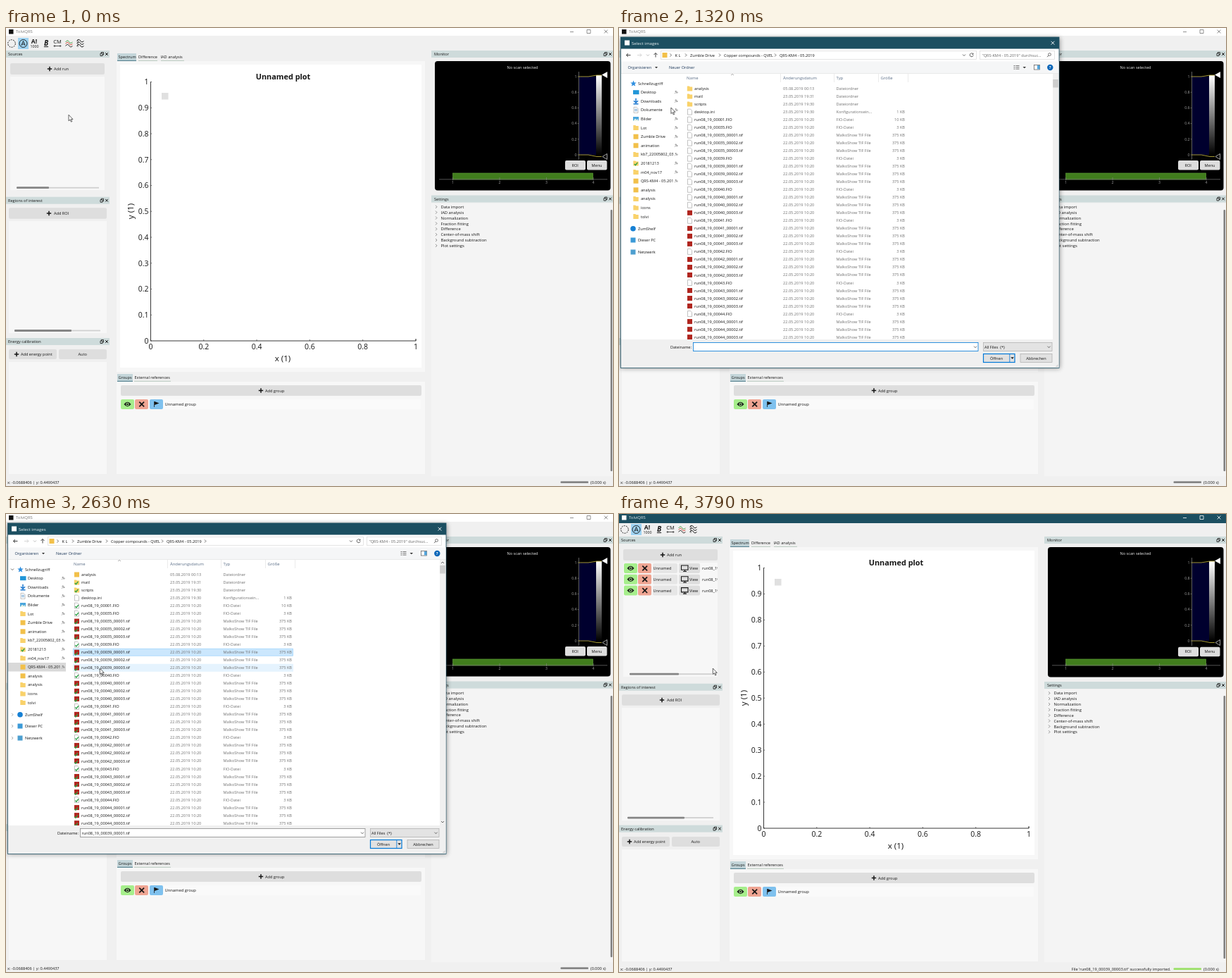
An HTML page for the animation above (4.18 s loop, 862 by 650 pixels).

```html
<!DOCTYPE html>
<html lang="en">
<head>
<meta charset="utf-8">
<title>Import of runs</title>
<style>
  html, body { margin: 0; width: 100%; height: 100%; overflow: hidden; background: #f0f0f0; }
  svg { display: block; }
  text { font-family: "Open Sans", "Noto Sans", sans-serif; white-space: pre; }
</style>
</head>
<body>
<svg id="stage" width="862" height="650" viewBox="0 0 862 650">
  <defs>
    <linearGradient id="grey" x2="0" y2="1"><stop stop-color="#fff"/><stop offset="1"/></linearGradient>
    <filter id="shade" x="-5%" y="-5%" width="110%" height="110%"><feGaussianBlur stdDeviation="3.5"/></filter>
  </defs>
  <g id="main"></g><g id="dialog"></g><g id="pointer"></g>
</svg>
<script>
const LOOP = 4180, STEP = 77.3;
const APP = 'TolviQRS', FOLDER = 'QRS-KM4 - 05.2019';
const TEAL = '#1c4f61', INK = '#151515';

// Markup helpers; text is placed by its vertical centre.
const rect = (x, y, w, h, fill, extra = '') =>
  `<rect x="${x}" y="${y}" width="${w}" height="${h}" fill="${fill}" ${extra}/>`;
const box = (x, y, w, h, fill, stroke, sw = .7) =>
  rect(x + .5, y + .5, w - 1, h - 1, fill, `stroke="${stroke}" stroke-width="${sw}"`);
const text = (x, y, str, { size = 5.6, fill = INK, at = 'start', extra = '' } = {}) =>
  `<text x="${x}" y="${y + size * .36}" font-size="${size}" fill="${fill}" text-anchor="${at}" ${extra}>${str}</text>`;
const line = (d, stroke = INK, w = .8, extra = '') =>
  `<path d="${d}" fill="none" stroke="${stroke}" stroke-width="${w}" ${extra}/>`;
const shape = (d, fill, extra = '') => `<path d="${d}" fill="${fill}" ${extra}/>`;
const dot = (x, y, r, fill, extra = '') => `<circle cx="${x}" cy="${y}" r="${r}" fill="${fill}" ${extra}/>`;
const clip = (x, y, w, h, inner) => `<svg x="${x}" y="${y}" width="${w}" height="${h}">${inner}</svg>`;
const cross = (x, y, r, color = INK, w = 1) =>
  line(`M${x - r} ${y - r}l${2 * r} ${2 * r}m0 ${-2 * r}l${-2 * r} ${2 * r}`, color, w);
const plus = (x, y) => line(`M${x - 3.2} ${y}h6.4M${x} ${y - 3.2}v6.4`, INK, 1.5);
const right = (x, y, color = '#777') => line(`M${x - 1} ${y - 2}l2 2l-2 2`, color, .8);
const down = (x, y, color = '#444') => line(`M${x - 2} ${y - 1}l2 2l2 -2`, color, .8);
const range = n => [...Array(n).keys()];

const button = (x, y, w, h, label, tx, px, fill = '#dedede') =>
  rect(x, y, w, h, fill, 'rx="2"') + (px ? plus(px, y + h / 2) : '') + text(tx, y + h / 2, label);

const dock = (x, w, y, label) => {
  const r = x + w;
  return rect(x, y, w, 10, '#cedbdb') + text(x + (x ? 4 : 3), y + 5.2, label) +
    line(`M${r - 13} ${y + 4}h3v3.5h-3zM${r - 11.7} ${y + 4}v-1.5h3.2v3.5h-1.5`, INK, .8) +
    cross(r - 4, y + 5, 1.8);
};

const scroll = (x, y, thumb, track) =>
  rect(x, y - .9, track, 1.8, '#d0d0d0') + rect(x, y - 1.4, thumb, 2.8, '#858585', 'rx="1"');

const eye = (x, y) =>
  shape(`M${x - 5} ${y}q5 -6.4 10 0q-5 6.4 -10 0z`, INK) + dot(x, y, 2.2, '#a8ee8e') + dot(x, y, 1.2, INK);
const rowButtons = (x, y) =>
  rect(x, y - 7, 19, 14, '#a6ee8c', 'rx="2"') + eye(x + 9.5, y) +
  rect(x + 20, y - 7, 19, 14, '#efa593', 'rx="2"') + cross(x + 29.7, y, 3.4, INK, 1.7);

function titleBar(active) {
  const ink = active ? '#fff' : '#777';
  return rect(0, 0, 862, active ? 13 : 11, active ? TEAL : '#fff') +
    rect(4, 2, 6.5, 6.5, active ? '#fff' : '#111') +
    text(14, 5.2, APP, { size: 5.9, fill: active ? '#dfe9ec' : '#777' }) +
    line('M801 5.5h5M825 2.5h5v5h-5z', ink, .8) + cross(852, 5, 2.4, ink, .8);
}

function toolBar() {
  const wave = (x, y, color) => line(`M${x} ${y}q3 -4 5 -.5t5 .5`, color, 1);
  return dot(8, 22, 5.3, 'none', 'stroke="#222" stroke-dasharray="2 1.3"') +
    rect(17, 14, 15, 16, '#9fd3f2') + dot(24.5, 22, 5.5, 'none', 'stroke="#111" stroke-width=".9"') +
    line('M21.8 25l2.7 -6.5l2.7 6.5m-4.4 -2h3.4', INK, .9) +
    text(40, 19, 'A!', { size: 8.5, at: 'middle', extra: 'font-weight="700"' }) +
    text(40.5, 26, '1000', { size: 5.2, at: 'middle' }) +
    text(57, 21.5, 'B', { size: 10, at: 'middle', extra: 'font-weight="700" font-style="italic" text-decoration="underline"' }) +
    text(73, 19.5, 'CM', { size: 7.5, at: 'middle' }) +
    line('M68 25.5h10m-8.5 -1.5l-1.5 1.5l1.5 1.5m7 -3l1.5 1.5l-1.5 1.5', INK, .7) +
    wave(84.5, 20, '#45a045') + wave(84.5, 22.5, '#d64b3c') + wave(84.5, 25.5, '#333') +
    [18.5, 22, 25.5].map(y => wave(100.5, y, INK)).join('') + line('M102 16v11', INK, .6);
}

function sources(s) {
  const rows = range(s.runs).map(i => {
    const y = 77 + 15.8 * i;
    return rowButtons(7, y) + rect(48, y - 7, 35, 14, '#e6e6e6', 'rx="2"') + text(48.5, y, 'Unnamed') +
      rect(85, y - 7, 30, 14, '#dedede', 'rx="2"') + line(`M88.5 ${y - 4}h9.5v6.3h-9.5zM91 ${y + 4.5}h5m-2.5 -2v2`, INK, 1.1) +
      text(100, y, 'View') + clip(117, y - 5, 23, 10, text(1, 5, 'run08_19_00039'));
  });
  return dock(0, 147, 32, 'Sources') +
    button(6, 50, 134, 16, 'Add run', 68, 62, s.hover ? '#c0d4dc' : '#dedede') +
    rect(6, 69, 134, 161 + s.d / 2, '#f7f7f7') + rows.join('') +
    scroll(15, 226.7 + s.d / 4, s.runs ? 70 : 46, 117);
}

function plot(d) {
  const bottom = 444 + d, y = i => bottom - (bottom - 76.5) * i / 10;
  const big = { size: 10.5 };
  return rect(157, 47, 438, 441 + d, '#f7f7f7') + rect(162, 52, 428, 430 + d, '#fff') +
    rect(158, 36, 27, 10, '#c4d6da') + line('M158 46.3h27', '#3b7080', 1) +
    line('M188 46.3h27m5 0h33', '#9fb8a8', .7) +
    text(159.5, 41.3, 'Spectrum') + text(188, 41.3, 'Difference') + text(219.5, 41.3, 'IAD analysis') +
    text(393.5, 69, 'Unnamed plot', { size: 10.9, at: 'middle', extra: 'font-weight="700"' }) +
    rect(221, 92, 9.5, 9.5, '#e0e0e0') +
    line(`M205.5 76.5V${bottom}H582v-3`, '#222', .9) +
    range(11).map(i => text(202.5, y(i), i % 10 ? '0.' + i : i / 10, { ...big, at: 'end' }) +
      line(`M205 ${y(i)}h2`, '#222', .6)).join('') +
    range(6).map(i => text(205.5 + 75.3 * i, bottom + 8.5, i % 5 ? '0.' + 2 * i : i / 5, { ...big, at: 'middle' }) +
      line(`M${205.5 + 75.3 * i} ${bottom}v-2`, '#222', .6)).join('') +
    text(393, bottom + 24.5, 'x (1)', { size: 11.6, at: 'middle' }) +
    text(0, 0, 'y (1)', { size: 11.6, at: 'middle', extra: `transform="translate(177 ${260 + d / 2}) rotate(-90)"` });
}

function groups(d) {
  const y = 534 + d;
  return rect(158, 491 + d, 22, 10, '#c4d6da') + line(`M158 ${501.3 + d}h22`, '#3b7080', 1) +
    line(`M182 ${501.3 + d}h52`, '#9fb8a8', .7) +
    text(159.5, 496.2 + d, 'Groups') + text(182.5, 496.2 + d, 'External references') +
    rect(157, 502 + d, 438, 131, '#f7f7f7') + button(163, 507 + d, 427, 15, 'Add group', 368, 362) +
    rect(163, y - 7, 426, 14, '#fafafa') + rowButtons(163, y) +
    rect(204, y - 7, 19, 14, '#7fc1ee', 'rx="2"') +
    line(`M210.5 ${y - 4}v8`, INK, .8) + shape(`M211 ${y - 4}l6.5 2.5l-6.5 2.5z`, INK) +
    text(225.5, y, 'Unnamed group', { size: 5.8 });
}

function monitor(d) {
  const tick = { size: 5.2, fill: '#a0a0a0' };
  return dock(604, 258, 32, 'Monitor') + rect(609, 47, 249.5, 183.5 + d / 2, '#000', 'rx="4"') +
    text(733.5, 55.8, 'No scan selected', { fill: '#eee', at: 'middle' }) +
    rect(814, 69, 24, 111, '#00002e') + rect(838, 67, 8, 113, 'url(#grey)') +
    line('M813.5 62v125', '#8a8a8a', .7) +
    range(6).map(i => text(810.5, 180 - 22.2 * i, i % 5 ? '0.' + 2 * i : i / 5, { ...tick, at: 'end' }) +
      line(`M811.5 ${180 - 22.2 * i}h2`, '#8a8a8a', .6)).join('') +
    line('M813 69h14l12 -2h7M813 180h14l12 2.5h7', '#b5a83a', .9) +
    shape('M846 66.5l8 -4.5v9z', '#fff') + shape('M847 182.5l6.5 -4v8z', '#000', 'stroke="#ccc" stroke-width=".8"') +
    button(794, 188 + d / 3, 29, 13.5, 'ROI', 803.5) + button(825, 188 + d / 3, 28.5, 13.5, 'Menu', 831.5) +
    box(634, 205.5, 200, 10, '#417d1d', '#5c9a35') + line('M615 214.8h239', '#777', .7) +
    range(4).map(i => text(634.5 + 66.5 * i, 219, i + 1, { ...tick, at: 'middle' }) +
      line(`M${634.5 + 66.5 * i} 212v4`, '#8a8a8a', .6)).join('');
}

function settings(d) {
  const items = ['Data import', 'IAD analysis', 'Normalization', 'Fraction fitting', 'Difference',
    'Center-of-mass shift', 'Background subtraction', 'Plot settings'];
  return dock(604, 258, 237.5 + d / 4, 'Settings') + rect(604, 248.5, 258, 388, '#f4f4f4') +
    items.map((item, i) => {
      const y = 253.8 + 7.87 * i + d / 5;
      return right(611, y) + text(617.5, y, item, { size: 5.85 });
    }).join('') + rect(858.5, 258, 2.6, 371 + d, '#808080', 'rx="1"');
}

function mainWindow(s) {
  const d = s.d;
  return rect(0, 0, 862, 650, '#f0f0f0') + titleBar(s.active) + toolBar() + sources(s) +
    dock(0, 147, 239.7 + d / 2, 'Regions of interest') + button(4, 255.3 + d / 2, 139, 15.5, 'Add ROI', 68, 61) +
    rect(4, 274 + d / 2, 139, 159 + d / 2, '#f7f7f7') + scroll(12, 429.5 + d * .8, 81, 122) +
    dock(0, 147, 440 + d * .8, 'Energy calibration') +
    button(4, 456 + d, 68, 14, 'Add energy point', 21, 15) + button(75, 456 + d, 68, 14, 'Auto', 102.5) +
    rect(4, 474 + d, 139, 159, '#f7f7f7') +
    plot(d) + groups(d) + monitor(d) + settings(d) +
    text(2, 644.7 + d / 2, 'x: -0.0688406 | y: 0.4490437') +
    (s.runs ? text(783.5, 645.8, `File 'run08_19_00039_0000${s.runs}.tif' successfully imported.`, { at: 'end' }) : '') +
    rect(787.5, 643.3 + d / 2, 39.5, 2.6, s.runs ? '#9be068' : '#858585', 'rx="1"') +
    text(830, 644.7 + d / 2, '(0.000 s)');
}

const folder = (x, y) => shape(`M${x - 3.7} ${y - 3.5}h3l1 1h3.4v6h-7.4z`, '#f9d26a');
const sheet = (x, y) => shape(`M${x - 3} ${y - 4}h4l2 2v6h-6z`, '#fff', 'stroke="#999" stroke-width=".6"');
const tile = (x, y, color) => rect(x - 3.5, y - 3.5, 7, 7, color);
const check = (x, y) => line(`M${x - 2.2} ${y + 1}l1.6 1.7l3 -3.8`, '#27a243', 1.3);

const files = [['analysis', '05.08.2019 00:13'], ['matl', '23.05.2019 19:31'], ['scripts', '23.05.2019 19:30']]
  .map(([name, date]) => ({ name, date, kind: 'Dateiordner' }));
files.push({ name: 'desktop.ini', date: '23.05.2019 19:30', kind: 'Konfigurationsein...', size: 1 });
for (const run of [1, 35, 39, 40, 41, 42, 43, 44]) {
  const name = 'run08_19_000' + String(run).padStart(2, '0'), date = '22.05.2019 10:20';
  files.push({ name: name + '.FIO', date, kind: 'FIO-Datei', size: run > 1 ? 3 : 10 });
  if (run > 1) for (const part of [1, 2, 3])
    files.push({ name: `${name}_0000${part}.tif`, date, kind: 'MalkoShow TIF File', size: 375 });
}

function fileIcon(file, i, y, synced) {
  if (i < 3) return synced && !i ? tile(100.5, y, '#f2c04a') : folder(100.5, y) + (synced ? check(100, y) : '');
  if (file.size === 375 && (synced || i > 15)) return tile(100.5, y, '#b0261f') + (synced ? check(99.5, y + 1) : '');
  return sheet(100.5, y) + (synced && i > 3 ? check(100.5, y) : '');
}

function fileList(s) {
  const meta = { fill: '#707070' };
  return files.map((file, i) => {
    const y = 86 + 11.02 * i, picked = i >= 10 && i < 10 + s.picked;
    return (picked ? box(95, y - 5.5, 313, 11, '#cbe7fd', '#99d1fb') : i === s.row ? rect(95, y - 5.5, 313, 11, '#e5f3fe') : '') +
      fileIcon(file, i, y, s.synced) + text(107, y, file.name, { size: 5.65 }) +
      text(233, y, file.date, meta) + text(308.5, y, file.kind, meta) +
      (file.size ? text(406, y, file.size + ' KB', { ...meta, at: 'end' }) : '');
  }).join('');
}

function sidebar(s) {
  const names = ['Schnellzugriff', 'Desktop', 'Downloads', 'Dokumente', 'Bilder', 'Lot', 'Zumble Drive', 'animation',
    'kb7_22005802_03', '20181213', 'm04_nov17', FOLDER, 'analysis', 'analysis', 'icons', 'tolvi'];
  const icon = (i, y) => {
    if (!i) return shape(`M20.5 ${y - 4}l1.2 2.8l3 .2l-2.3 2l.8 3l-2.7 -1.7l-2.7 1.7l.8 -3l-2.3 -2l3 -.2z`, '#2f8fe0');
    if (i === 1) return rect(20, y - 3, 8.5, 6, '#2196d8');
    if (i === 2) return line(`M24 ${y - 4}v6.5m-3 -3l3 3l3 -3M20.5 ${y + 4}h7`, '#1d78d0', 1.5);
    if (i === 3) return sheet(24, y) + line(`M22 ${y - 1}h4m-4 2h4`, '#4c8fc8', .8);
    if (i === 4) return rect(20, y - 3, 8, 6, '#4aa6dc') + shape(`M20 ${y + 3}l3 -3.5l2 2l1.5 -1.5l1.5 3z`, '#e8f3e8');
    if ([6, 7, 11, 12].includes(i)) return tile(24, y, '#f2c04a');
    return folder(24, y) + (i === 9 ? check(24, y) : '');
  };
  const selected = s.nav ? rect(3, 211, 82, 12.5, s.nav) : '';
  const list = names.map((name, i) => {
    const y = 78.6 + 12.6 * i;
    return icon(i, y) + clip(i ? 31 : 27, y - 6, i === 11 ? 46 : 54, 12, text(0, 6, name)) +
      (i && i < 12 ? line(`M79 ${y + 2}l1.7 -1.7m-.8 -1.8l2.6 2.6m-1.8 -3.3l2.6 2.6l-1.8 .7m-.8 -3.3l-.8 1.8`, '#777', .7) : '');
  }).join('');
  const roots = tile(20, 301, '#3b9ad8') + dot(20, 284.8, 3.8, '#1680d4') +
    tile(20, 318, '#4d9fd0') + text(27, 284.8, 'ZumShelf') + text(27, 301, 'Dieser PC') + text(27, 318, 'Netzwerk');
  const arrows = `<g opacity="${s.arrows}">${down(9, 78.6)}${[284.8, 301, 318].map(y => right(9, y, '#999')).join('')}</g>`;
  const tip = s.tip ? box(28, 211.5, 55, 12, '#fff', '#777') + text(31, 217.2, FOLDER) : '';
  return selected + list + roots + arrows + tip;
}

function dialogWindow(s) {
  if (!s.open) return '';
  const grey = { fill: '#5c6f88' };
  const path = [[79.5, 'K L'], [101, 'Zumble Drive'], [149, 'Copper compounds - QVEL'], [228, FOLDER]];
  const head = rect(2, 14, 624, 469, '#000', 'opacity=".4" filter="url(#shade)"') +
    rect(2.5, 13, 622.5, 469.5, '#fff', `stroke="${TEAL}" stroke-width=".8"`) + rect(2.5, 13, 622.5, 16.5, TEAL) +
    (s.closing ? '' : rect(8, 17.5, 7, 7, '#fff') + cross(616, 21.2, 2.4, '#fff', .9)) +
    text(s.closing ? 7 : 18, 21.4, 'Select images', { size: 6.1, fill: '#e9f1f3' });
  const address = line('M10.5 38.5h6m-6 0l2.5 -2.5m-2.5 2.5l2.5 2.5M52 41.5v-6m-2.5 2.5l2.5 -2.5l2.5 2.5', '#333', .9) +
    line('M26 38.5h6m0 0l-2.5 -2.5m2.5 2.5l-2.5 2.5', '#ccc', .8) + down(41, 38.5, '#aaa') +
    box(59, 32, 449, 13, '#fff', '#d9d9d9') + tile(65, 38.5, '#f2c04a') +
    path.map(([x, name]) => right(x - 6, 38.5, '#444') + text(x, 38.5, name)).join('') +
    (s.trail ? right(283, 38.5, '#444') : '') + down(490, 38.5) +
    line('M502.5 36.5a2.5 2.5 0 1 0 .7 2m-.2 -3v1.8h-1.8', '#444', .8) +
    box(512, 32, 107, 13, '#fff', '#d9d9d9') + text(515.5, 38.5, `"${FOLDER}" durchsuc...`, { fill: '#666' }) +
    dot(611.5, 37.5, 1.9, 'none', 'stroke="#555" stroke-width=".8"') + line('M610 39l-2 2.2', '#555', .9);
  const tools = rect(3, 47.5, 621.5, 17, '#f5f6f7') + line('M3 64.5h621.5', '#e2e2e2', .7) +
    text(12.5, 56, 'Organisieren', { fill: '#1e395b' }) + shape('M51 55h4l-2 2.2z', '#333') +
    text(71, 56, 'Neuer Ordner', { fill: '#1e395b' }) +
    line('M560.5 53.5h2m1 0h5m-8 2.3h2m1 0h5m-8 2.3h2m1 0h5', '#666', .9) + shape('M573.5 55h4.5l-2.2 2.2z', '#333') +
    box(589, 52, 9, 7.5, '#fff', '#555') + rect(594, 53, 3.5, 5.5, '#51a4dc') +
    dot(612.3, 56, 4.2, '#0a66b8') + text(612.3, 56, '?', { fill: '#fff', size: 6, at: 'middle', extra: 'font-weight="700"' });
  const columns = [[96, 'Name'], [233, 'Änderungsdatum'], [308.5, 'Typ'], [371.5, 'Größe']]
    .map(([x, name]) => text(x, 71, name, { ...grey, size: 5.9 })).join('') +
    line('M229.5 65v12M305.5 65v12M368.5 65v12M410.5 65v12', '#e2e2e2', .7) + line('M159 67l2 -1.6l2 1.6', '#888', .7);
  const bar = rect(616, 65, 8.5, 377, '#f0f0f0') + rect(616.2, 73, 7.6, 11.5, '#cdcdcd') +
    (s.bar ? line('M618 70l2 -2l2 2M618 436l2 2l2 -2', '#444', .8) : '');
  const foot = rect(3, 442, 621.5, 40, '#f0f0f0') + text(103, 452.5, 'Dateiname:', { at: 'end' }) +
    box(105, 446, 405.5, 13, '#fff', s.focus ? '#0078d7' : '#8a8a8a', .8) + down(506, 452.7) +
    text(107.5, 452.7, s.fileName) +
    box(517, 446, 98.5, 13, '#e3e3e3', '#adadad') + text(519, 452.7, 'All Files  (*)') + down(610.5, 452.7) +
    box(517, 462, 45.5, 13, '#e1e1e1', '#0078d7', 1.2) + line('M554.8 462.5v12', '#0078d7', .8) +
    text(536, 468.5, 'Öffnen', { at: 'middle' }) + shape('M556.4 467.3h4.4l-2.2 2.4z', '#111') +
    box(569.5, 462, 46, 13, '#e1e1e1', '#adadad') + text(592.5, 468.5, 'Abbrechen', { at: 'middle' }) +
    line('M623.5 478l-3 3m3 -1l-1 1', '#aaa', .7);
  return head + address + tools + sidebar(s) + columns + fileList(s) + bar + foot;
}

const track = [[0, 89, 123.5], [540, 88.5, 60.5], [1243, 88.5, 60.5], [1470, 43.5, 222], [1940, 44, 222],
  [2165, 136, 202], [2390, 134, 196], [2630, 133.3, 219], [LOOP, 133.3, 219]];
function pointerAt(t) {
  const held = Math.max(0, 80 + Math.floor((t - 70) / STEP) * STEP);
  const i = Math.max(1, track.findIndex(key => key[0] >= held));
  const [t0, x0, y0] = track[i - 1], [t1, x1, y1] = track[i];
  const k = (held - t0) / (t1 - t0);
  return { x: x0 + (x1 - x0) * k, y: y0 + (y1 - y0) * k };
}

function pointer(t, { x, y }) {
  const clicked = [[850, 1000], [1700, 1780], [2400, 2480], [2780, 2860]].some(([a, b]) => t >= a && t < b);
  const ring = clicked ? dot(x + .5, y - .5, 4.8, '#a3cf2b', 'opacity=".9"') + dot(x + .5, y - .5, 2, '#d5ea8d') : '';
  if (t >= 620 && t < 1320) return ring;
  const outline = 'stroke="#222" stroke-width=".7" stroke-linejoin="round"';
  const hand = t >= 1400 && x < 87
    ? `M${x - .8} ${y}q1 -1 1.8 0v4l4 1q1 .3 .8 1.5l-.8 4v1.5h-5l-3 -4q-.5 -1.5 1 -1l1.2 1z`
    : `M${x} ${y}v8.6l2 -1.8l1.4 3.2l1.4 -.6l-1.4 -3.1h2.6z`;
  return ring + shape(hand, '#fff', outline);
}

function stateAt(t) {
  const cursor = pointerAt(t), open = t >= 1320 && t < 3560;
  const picked = t >= 2780 ? 3 : t >= 2400 ? 1 : 0;
  const file = n => `run08_19_00039_0000${n}.tif`;
  const fade = Math.floor((t - 2780) / (2 * STEP)) / 4.5;
  const runs = t >= 3790 ? 3 : t >= 3710 ? 2 : t >= 3640 ? 1 : 0;
  return {
    cursor, open, picked, runs,
    d: runs ? 2 : 0,
    active: (t >= 850 && t < 1320) || t >= 3560,
    hover: t < 1320 && cursor.y < 66,
    closing: t >= 3480,
    synced: t >= 1700,
    bar: t >= 1540,
    focus: t < 1780,
    trail: t >= 1850,
    tip: t >= 1470 && t < 1850,
    nav: t < 1400 ? '' : t < 2400 ? '#cce8ff' : '#d9d9d9',
    arrows: t < 1400 || t >= 3480 ? 0 : t < 2780 ? 1 : Math.max(0, 1 - fade),
    row: t >= 2020 && cursor.x > 95 ? Math.round((cursor.y - 86) / 11.02) : -1,
    fileName: picked === 3 ? [3, 1, 2].map(n => `"${file(n)}"`).join(' ') : picked ? file(1) : ''
  };
}

const shown = {};
function update(id, markup) {
  if (shown[id] === markup) return;
  shown[id] = markup;
  document.getElementById(id).innerHTML = markup;
}

function render(t) {
  const s = stateAt(t);
  update('main', mainWindow(s));
  update('dialog', dialogWindow(s));
  update('pointer', pointer(t, s.cursor));
}

const start = performance.now();
function tick() {
  render((performance.now() - start) % LOOP);
  requestAnimationFrame(tick);
}
tick();
</script>
</body>
</html>
```
